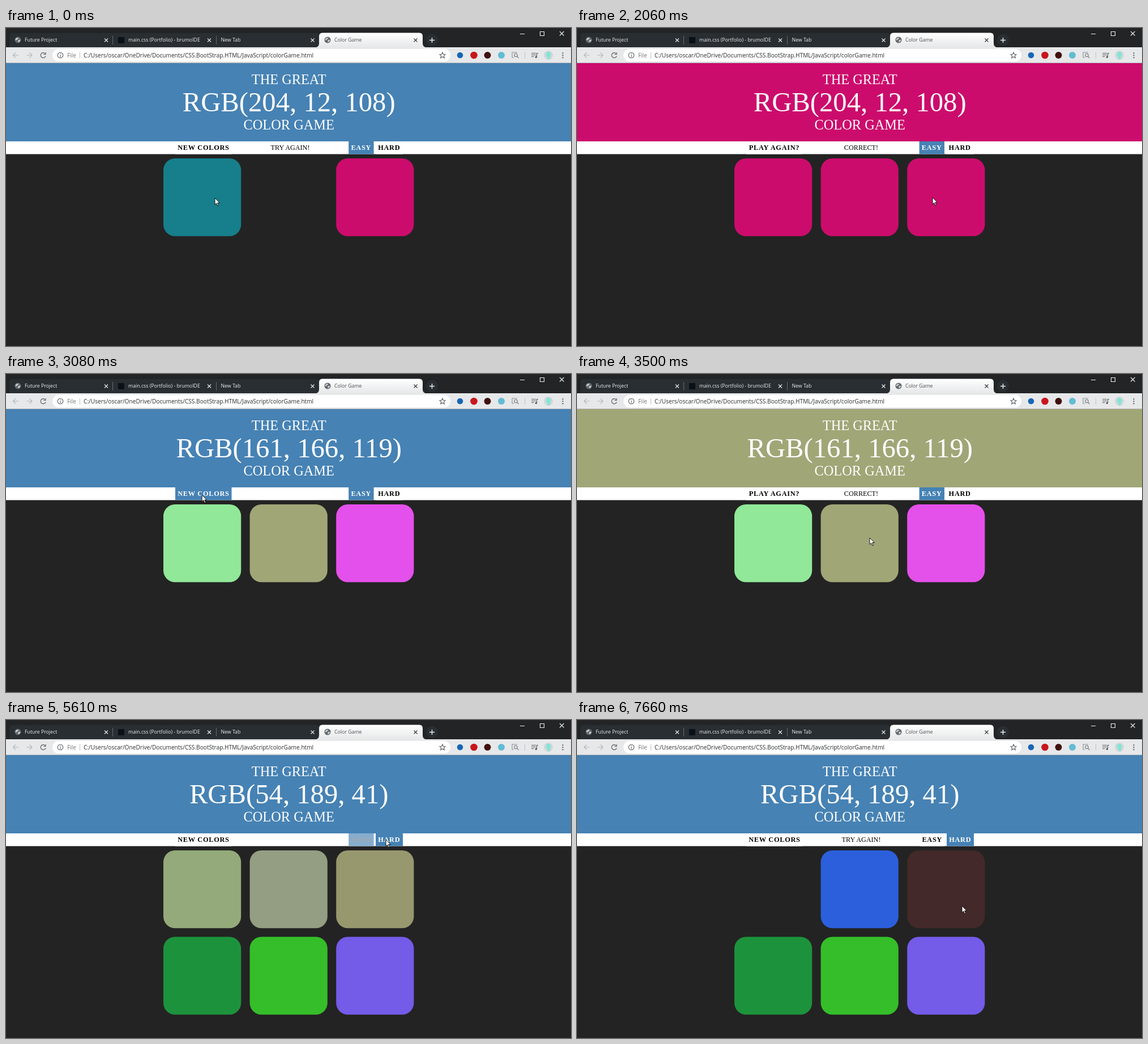
An HTML page for the animation above (8000 ms loop, 998x561 px).

```html
<!DOCTYPE html>
<html lang="en">
<head>
<meta charset="utf-8">
<title>Color Game</title>
<style>
  html, body { margin: 0; width: 100%; height: 100%; overflow: hidden; background: #232323; }
  svg { display: block; width: 100vw; height: 100vh; }
  .ui { font: 8.76px "Open Sans", sans-serif; fill: #eceef0; }
  .url { font-size: 10.15px; fill: #2b2d30; }
  .line { fill: none; stroke-width: 1.1; }
  .title { font: 24.35px "Liberation Serif", serif; fill: #fff; text-anchor: middle; }
  .button { font: bold 12.3px "Liberation Serif", serif; letter-spacing: .73px; }
  #message { font: 12.2px "Liberation Serif", serif; text-anchor: middle; }
  #rgb { font-size: 48.7px; }
</style>
</head>
<body>
<svg viewBox="0 0 998 561">
  <defs>
    <linearGradient id="shine" x2="0" y2="1">
      <stop stop-color="#fff"/><stop offset="1" stop-color="#e6e7e8"/>
    </linearGradient>
    <g id="globe">
      <circle r="5.6" fill="#62676c"/>
      <path d="M-4 -2Q-1 -5 1 -3.5Q1 -1.5 -1 -1Q-2 1 -4.5 .5ZM0 1Q3 -1 4.5 .5Q3 4 .5 4.5Q1 2.5 0 1Z" fill="#c9cdd0"/>
    </g>
    <path id="cross" d="M-3 -3L3 3M3 -3L-3 3" class="line"/>
  </defs>

  <!-- tab strip -->
  <rect width="998" height="35" fill="#222425"/>
  <path d="M6 34V14Q6 9 11 9H548Q553 9 553 14V34Z" fill="#292e32"/>
  <path d="M188.5 14V29M371.5 14V29" stroke="#666b6f"/>
  <path d="M546 34.5Q553 34 553 27V14.400Q553 8.400 559 8.400H730Q736 8.400 736 14.400V27Q736 34 743 34.5Z" fill="url(#shine)"/>
  <use href="#globe" x="21" y="21"/>
  <rect x="198" y="16" width="11" height="11" fill="#0b1118"/>
  <use href="#globe" x="568" y="21"/>
  <g class="ui">
    <text x="33" y="24.3">Future Project</text>
    <text x="216" y="24.3">main.css (Portfolio) - brumoIDE</text>
    <text x="379.5" y="24.3">New Tab</text>
    <text x="580" y="24.3" fill="#4a4f54">Color Game</text>
  </g>
  <g stroke="#eceef0">
    <use href="#cross" x="177" y="21.5"/>
    <use href="#cross" x="359" y="21.5"/>
    <use href="#cross" x="541.5" y="21.5"/>
    <use href="#cross" x="723.5" y="21.5" stroke="#33373b"/>
    <circle cx="752.5" cy="21" r="10.5" fill="#292e32" stroke="none"/>
    <path class="line" style="stroke-width:1.5" d="M748 21.5H757M752.5 17V26"/>
    <path class="line" d="M908 10.5H916M943.5 6.5H950.5V13.5H943.5ZM978 6L985.5 13.5M985.5 6L978 13.5"/>
  </g>

  <!-- toolbar -->
  <rect y="34" width="998" height="27" fill="#e7e8e9"/>
  <rect y="61" width="998" height="1" fill="#b5b8ba"/>
  <rect x="82" y="37" width="703" height="22" rx="11" fill="#fff"/>
  <g class="line" stroke="#55595d">
    <path d="M22 48H12.5M17 43.5L12.5 48L17 52.5M36.5 48H46M41.5 43.5L46 48L41.5 52.5" stroke="#b3b6b9"/>
    <path d="M69 45A4.5 4.5 0 1 0 70 49.5M70 43V46.5H66.3"/>
    <circle cx="96" cy="48" r="4.8"/>
    <path d="M96 47.5V51M96 45V46.2"/>
    <path d="M130.5 42.5V54M916.5 42.5V54" stroke="#c3c5c7"/>
    <path d="M771 43L772.5 46.5L776 46.8L773.4 49.2L774.2 52.8L771 50.9L767.8 52.8L768.6 49.2L766 46.8L769.5 46.5Z"/>
    <path d="M902 44V43H894V52H897" stroke="#8b8f93"/>
    <circle cx="900.5" cy="48" r="2.7" stroke="#777b7f"/>
    <path d="M902.5 50L905.5 53" stroke="#777b7f"/>
    <path d="M928 44.5H936M928 47.5H936M928 50.5H932.5M937.5 51V44.5H940"/>
  </g>
  <circle cx="936.3" cy="51.2" r="1.7" fill="#55595d"/>
  <circle cx="802" cy="48" r="5.3" fill="#1766b5"/>
  <circle cx="826.5" cy="48" r="6.3" fill="#c8161d"/>
  <circle cx="850.5" cy="48" r="6" fill="#40110f"/>
  <circle cx="875" cy="48" r="6" fill="#62bcd3"/>
  <circle cx="958" cy="48" r="8" fill="#d3d7d7"/>
  <path d="M954 47A4.2 5 0 1 1 961 50.5L960.5 55H956.5V51.5Q954 50 954 47Z" fill="#80e5d7"/>
  <path d="M983.5 43.2V45.2M983.5 47.2V49.2M983.5 51.2V53.2" stroke="#55595d" stroke-width="2"/>
  <g class="ui">
    <text class="url" x="108" y="51.7" style="fill:#74787c">File</text>
    <text class="url" x="137" y="51.7">C:/Users/oscar/OneDrive/Documents/CSS.BootStrap.HTML/JavaScript/colorGame.html</text>
  </g>

  <!-- page -->
  <rect id="header" y="62" width="998" height="138"/>
  <text class="title" x="499.7" y="99">THE GREAT</text>
  <text class="title" x="499.7" y="147.3" id="rgb"></text>
  <text class="title" x="499.7" y="179">COLOR GAME</text>
  <rect y="200" width="998" height="22.5" fill="#fff"/>
  <text id="message" x="502" y="215"></text>
  <g id="buttons" class="button"></g>
  <g id="squares"></g>
  <path id="cursor" d="M0 0V16L3.7 12.6L6.5 19L9 17.9L6.3 11.7H11.5Z" fill="#fff" stroke="#000" stroke-width="1.2"/>
</svg>

<script>
const LOOP = 8000, SQUARE_FADE = 300, BUTTON_FADE = 150;
const BLUE = [70, 130, 180], WHITE = [255, 255, 255], BLACK = [0, 0, 0], DARK = [35, 35, 35];
const PINK = [204, 12, 108], OLIVE = [161, 166, 119];

// Clicks that drive the game.
const WIN1 = 945, RESET = 2798, WIN2 = 3497, HARD = 5577, MISS = 6820;

// Tracks: a start value, then [time, value] pairs.
const header = [[0, BLUE], [WIN1, PINK], [RESET, BLUE], [WIN2, OLIVE], [HARD, BLUE]];
const goal = [[0, PINK], [RESET, OLIVE], [HARD, [54, 189, 41]]];
const message = [[0, 'TRY AGAIN!'], [WIN1, 'CORRECT!'], [RESET, ''], [WIN2, 'CORRECT!'], [HARD, ''], [MISS, 'TRY AGAIN!']];
const won = [[0, false], [WIN1, true], [RESET, false], [WIN2, true], [HARD, false]];
const squares = [
  [[0, [22, 127, 139]], [0, DARK], [WIN1, PINK], [RESET, [144, 232, 152]], [WIN2, OLIVE], [HARD, [45, 202, 146]], [MISS, DARK]],
  [[0, DARK], [WIN1, PINK], [RESET, OLIVE], [HARD, [44, 95, 220]]],
  [[0, PINK], [RESET, [228, 80, 235]], [WIN2, OLIVE], [HARD, [67, 41, 41]]],
  [[0, [29, 146, 60]]], [[0, [53, 190, 41]]], [[0, [116, 91, 232]]]
];
// Buttons: box left, box width, label, highlight track.
const buttons = [
  [299, 99.5, 'NEW COLORS', [[0, 0], [2600, 1], [3160, 0]]],
  [605.2, 44.4, 'EASY', [[0, 1], [HARD, 0], [6130, 1], [6260, 0]]],
  [653, 48, 'HARD', [[0, 0], [5180, 1]]]
];
const path = [
  [60, 369, 300], [900, 646, 304.6], [1950, 646, 304.6], [2690, 345, 213], [3060, 345, 213], [3480, 517, 289],
  [4200, 517, 289], [4560, 492, 273], [5280, 671, 211], [6060, 671, 211], [6570, 315, 320],
  [6790, 315, 320], [7220, 470, 357], [7660, 680, 328]
];
// The screen refreshes in bursts: first time, last time, count.
const bursts = [[120, 1020, 8], [1170, 1320, 2], [2060, 3080, 9], [3230, 3770, 5], [4040, 4040, 1],
  [4350, 5310, 8], [5460, 5880, 4], [6150, 6570, 4], [6850, 7660, 7]];
const refreshes = [0];
for (const [first, last, count] of bursts)
  for (let i = 0; i < count; i++)
    refreshes.push(first + 30 * Math.round((last - first) * i / Math.max(1, count - 1) / 30 - .1));

const clamp = v => Math.min(1, Math.max(0, v));
const lerp = (a, b, p) => a + (b - a) * p;
const mix = (a, b, p) => a.map((v, i) => lerp(v, b[i], p));
const css = c => `rgb(${c.map(Math.round)})`;
const bezier = (a, b, s) => 3 * a * s * (1 - s) ** 2 + 3 * b * s * s * (1 - s) + s ** 3;

// The CSS "ease" curve.
function ease(x) {
  if (x <= 0 || x >= 1) return clamp(x);
  let lo = 0, hi = 1;
  for (let i = 0; i < 20; i++) {
    const mid = (lo + hi) / 2;
    if (bezier(.25, .25, mid) < x) lo = mid; else hi = mid;
  }
  return bezier(.1, 1, lo);
}
const current = (track, t) => track.filter(([start]) => start <= t).pop()[1];
const fade = (track, t, duration, blend) => track.slice(1).reduce(
  (value, [start, next]) => blend(value, next, ease((t - start) / duration)), track[0][1]);

function cursorAt(t) {
  const i = path.findIndex(([time]) => time > t);
  if (i === 0) return path[0].slice(1);
  if (i < 0) return path[path.length - 1].slice(1);
  const [a, b] = [path[i - 1], path[i]], p = (t - a[0]) / (b[0] - a[0]);
  return mix(a.slice(1), b.slice(1), p * p * (3 - 2 * p));
}

const $ = id => document.getElementById(id);
function add(parent, tag, attributes) {
  const node = document.createElementNS('http://www.w3.org/2000/svg', tag);
  for (const key in attributes) node.setAttribute(key, attributes[key]);
  return parent.appendChild(node);
}
const squareNodes = squares.map((_, i) => add($('squares'), 'rect', {
  x: 278 + i % 3 * 152.6, y: 230 + Math.floor(i / 3) * 152.5, width: 137.2, height: 137.2, rx: 20.5
}));
const buttonNodes = buttons.map(([x, width, label]) => {
  const box = add($('buttons'), 'rect', { x, y: 200, width, height: 22.5 });
  const text = add($('buttons'), 'text', { x: x + 4.2, y: 215 });
  text.textContent = label;
  return { box, text };
});

function draw(t) {
  const over = current(won, t);
  $('header').setAttribute('fill', css(current(header, t)));
  $('rgb').textContent = `RGB(${current(goal, t).join(', ')})`;
  $('message').textContent = current(message, t);
  $('buttons').setAttribute('transform', `translate(${over ? -.6 : 0})`);
  buttonNodes[0].text.textContent = over ? 'PLAY AGAIN?' : 'NEW COLORS';
  buttonNodes[0].text.setAttribute('x', over ? 304.4 : 303.2);
  buttonNodes.forEach(({ box, text }, i) => {
    const lit = fade(buttons[i][3], t, BUTTON_FADE, lerp);
    box.setAttribute('fill', css(mix(WHITE, BLUE, lit)));
    text.setAttribute('fill', css(mix(BLACK, WHITE, lit)));
  });
  squareNodes.forEach((node, i) => {
    node.setAttribute('fill', css(fade(squares[i], t, SQUARE_FADE, mix)));
    node.setAttribute('visibility', i < 3 || t >= HARD ? 'visible' : 'hidden');
  });
  $('cursor').setAttribute('transform', `translate(${cursorAt(t)}) scale(.73)`);
}

function tick() {
  const now = performance.now() % LOOP;
  draw(refreshes.filter(time => time <= now).pop());
  requestAnimationFrame(tick);
}
tick();
</script>
</body>
</html>
```
